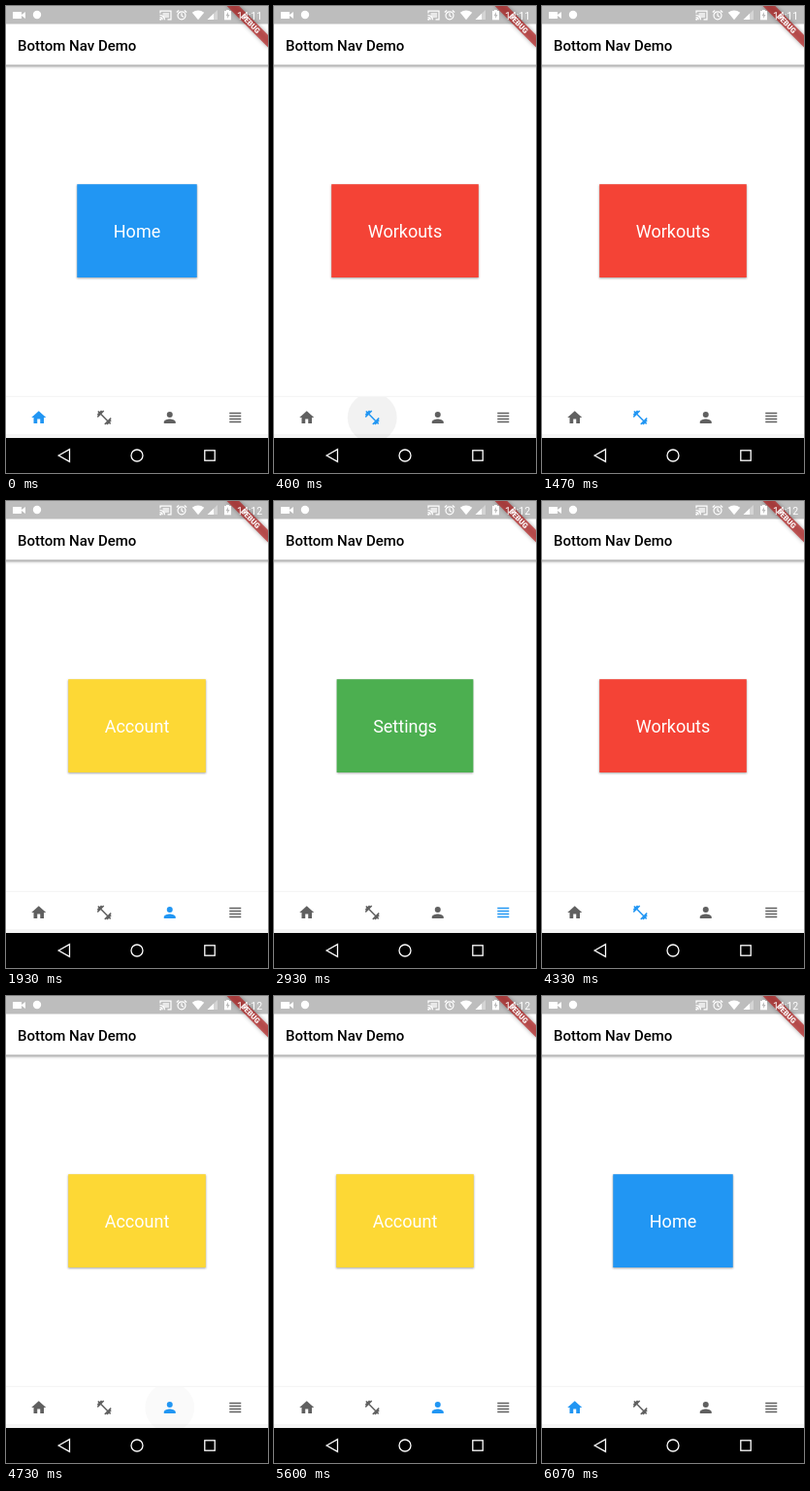
Write an HTML page with a canvas that moves like this. It is 270 by 480 pixels and loops after 6.47 s.

```html
<!DOCTYPE html>
<html lang="en">
<head>
<meta charset="utf-8">
<title>Bottom Nav Demo</title>
<style>
  html, body { margin: 0; width: 100%; height: 100%; overflow: hidden; background: #fff; }
  canvas { display: block; width: 270px; height: 480px; }
</style>
</head>
<body>
<canvas id="stage"></canvas>
<script>
const W = 270, H = 480, LOOP = 6470, STEP = 1000 / 15;
const canvas = document.getElementById('stage');
const ctx = canvas.getContext('2d');
const dpr = window.devicePixelRatio || 1;
canvas.width = W * dpr;
canvas.height = H * dpr;

const GREY = '#606060', BLUE = '#2196f3';
const pages = [
  { label: 'Home', color: '#2196f3', icon: 'M10 20v-6h4v6h5v-8h3L12 3 2 12h3v8z' },
  { label: 'Workouts', color: '#f44336', icon: 'M20.57 14.86L22 13.43 20.57 12 17 15.57 8.43 7 12 3.43 10.57 2 9.14 3.43 7.71 2 5.57 4.14 4.14 2.71 2.71 4.14l1.43 1.43L2 7.71l1.43 1.43L2 10.57 3.43 12 7 8.43 15.57 17 12 20.57 13.43 22l1.43-1.43L16.29 22l2.14-2.14 1.43 1.43 1.43-1.43-1.43-1.43L22 16.29z' },
  { label: 'Account', color: '#fdd835', icon: 'M12 12a4 4 0 1 0 0-8 4 4 0 0 0 0 8zM12 14c-2.67 0-8 1.34-8 4v2h16v-2c0-2.66-5.33-4-8-4z' },
  { label: 'Settings', color: '#4caf50', icon: 'M4 5h16v2H4zM4 9h16v2H4zM4 13h16v2H4zM4 17h16v2H4z' }
].map((page, i) => ({ ...page, path: new Path2D(page.icon), x: 33.75 + i * 67.5 }));

// Each tap: time step at which the page switches, page index.
const taps = [[5, 0 + 1], [23, 2], [38, 3], [54, 1], [71, 2], [85, 0]];
const CLOCK_STEP = 25, RIPPLE_STEPS = 6;

function rect(x, y, w, h, color) {
  ctx.fillStyle = color;
  ctx.fillRect(x, y, w, h);
}

function circle(x, y, r, color) {
  ctx.fillStyle = color;
  ctx.beginPath();
  ctx.arc(x, y, r, 0, Math.PI * 2);
  ctx.fill();
}

function poly(points, color) {
  ctx.fillStyle = color;
  ctx.beginPath();
  points.forEach(([x, y]) => ctx.lineTo(x, y));
  ctx.closePath();
  ctx.fill();
}

function text(str, x, y, font, color, align = 'left') {
  ctx.font = font + ' Roboto, sans-serif';
  ctx.fillStyle = color;
  ctx.textAlign = align;
  ctx.fillText(str, x, y);
}

function withShadow(color, blur, dy, draw) {
  ctx.save();
  ctx.shadowColor = color;
  ctx.shadowBlur = blur * dpr;
  ctx.shadowOffsetY = dy * dpr;
  draw();
  ctx.restore();
}

function drawAppBar() {
  withShadow('rgba(0,0,0,.45)', 3, 1, () => rect(-5, 0, W + 10, 60.5, '#fff'));
  rect(0, 0, W, 18.5, '#bdbdbd');
  text('Bottom Nav Demo', 12, 45.5, '500 15px', '#000');
}

function drawBanner() {
  ctx.save();
  ctx.translate(W, 0);
  ctx.rotate(Math.PI / 4);
  withShadow('rgba(0,0,0,.5)', 4, 0, () => rect(-30, 21, 60, 9, 'rgba(183,28,28,.68)'));
  text('DEBUG', 0, 28.2, '900 7.65px', '#fff', 'center');
  ctx.restore();
}

function drawStatus(clock) {
  const white = '#fff';
  ctx.lineWidth = 1.2;
  ctx.strokeStyle = white;

  // video camera and notification
  rect(7, 6, 9, 7, white);
  poly([[16, 9], [20, 6], [20, 13], [16, 10]], white);
  circle(32, 9, 4.2, white);

  // cast
  ctx.beginPath();
  ctx.moveTo(159, 7.5);
  ctx.lineTo(159, 5.2);
  ctx.lineTo(170, 5.2);
  ctx.lineTo(170, 13.8);
  ctx.lineTo(166.5, 13.8);
  ctx.stroke();
  for (const r of [2.7, 5]) {
    ctx.beginPath();
    ctx.arc(158.5, 14.3, r, -Math.PI / 2, 0);
    ctx.stroke();
  }
  rect(161.5, 7, 6.5, 5, 'rgba(255,255,255,.65)');
  circle(159.2, 13.7, 1, white);

  // alarm
  ctx.beginPath();
  ctx.arc(181, 9.8, 4, 0, Math.PI * 2);
  ctx.moveTo(181, 7.3);
  ctx.lineTo(181, 10);
  ctx.lineTo(183, 11.2);
  ctx.moveTo(175.8, 6.5);
  ctx.lineTo(178.2, 4.5);
  ctx.moveTo(183.8, 4.5);
  ctx.lineTo(186.2, 6.5);
  ctx.stroke();

  // wifi
  ctx.fillStyle = white;
  ctx.beginPath();
  ctx.moveTo(198, 14.3);
  ctx.lineTo(191.8, 6.7);
  ctx.quadraticCurveTo(198, 2.3, 204.2, 6.7);
  ctx.fill();

  // signal and charging battery
  poly([[207.5, 14], [218, 14], [218, 4]], 'rgba(255,255,255,.35)');
  poly([[207.5, 14], [214, 14], [214, 7.8]], white);
  rect(225, 5, 7, 9.3, white);
  rect(227, 4, 3, 1, white);
  poly([[229, 6], [226.5, 10.2], [228.2, 10.2], [228, 13], [230.5, 9], [229, 9]], '#bdbdbd');

  text(clock, 238, 13.6, '400 10.5px', white);
}

function drawCard({ label, color }) {
  ctx.font = '400 18px Roboto, sans-serif';
  const w = ctx.measureText(label).width + 75;
  withShadow('rgba(0,0,0,.35)', 2, 0.5, () => rect(135 - w / 2, 183.2, w, 95.8, color));
  text(label, 135, 237.5, '400 18px', '#fff', 'center');
}

function drawTabs(active, age) {
  withShadow('rgba(0,0,0,.12)', 2, 0, () => rect(-5, 402, W + 10, 42, '#fff'));
  rect(0, 440, W, 4, '#f5f5f5');
  if (age < RIPPLE_STEPS) {
    const alpha = 0.02 + 0.06 * Math.sin(Math.PI * age / RIPPLE_STEPS);
    ctx.save();
    ctx.beginPath();
    ctx.rect(0, 402, W, 42);
    ctx.clip();
    circle(active.x, 423, 25.5, `rgba(0,0,0,${alpha})`);
    ctx.restore();
  }
  for (const page of pages) {
    ctx.save();
    ctx.translate(page.x - 9, 414);
    ctx.scale(0.75, 0.75);
    ctx.fillStyle = page === active ? BLUE : GREY;
    ctx.fill(page.path);
    ctx.restore();
  }
}

function drawSystemNav() {
  rect(0, 444, W, 36, '#000');
  ctx.strokeStyle = '#fff';
  ctx.lineWidth = 1.3;
  ctx.beginPath();
  ctx.moveTo(54.2, 462);
  ctx.lineTo(65.5, 455.7);
  ctx.lineTo(65.5, 468.3);
  ctx.closePath();
  ctx.stroke();
  ctx.beginPath();
  ctx.arc(135, 462, 6, 0, Math.PI * 2);
  ctx.stroke();
  ctx.strokeRect(204.8, 456.8, 10.4, 10.4);
}

function render(ms) {
  const step = Math.floor((ms + 5) / STEP);
  const tap = taps.filter(([at]) => at <= step).pop();
  const page = pages[tap ? tap[1] : 0];
  const age = tap ? step - tap[0] : Infinity;

  ctx.setTransform(dpr, 0, 0, dpr, 0, 0);
  rect(0, 0, W, H, '#fff');
  drawCard(page);
  drawAppBar();
  drawBanner();
  drawStatus(step < CLOCK_STEP ? '14:11' : '14:12');
  drawTabs(page, age);
  drawSystemNav();
}

const start = performance.now();
function tick() {
  render((performance.now() - start) % LOOP);
  requestAnimationFrame(tick);
}
tick();
</script>
</body>
</html>
```
